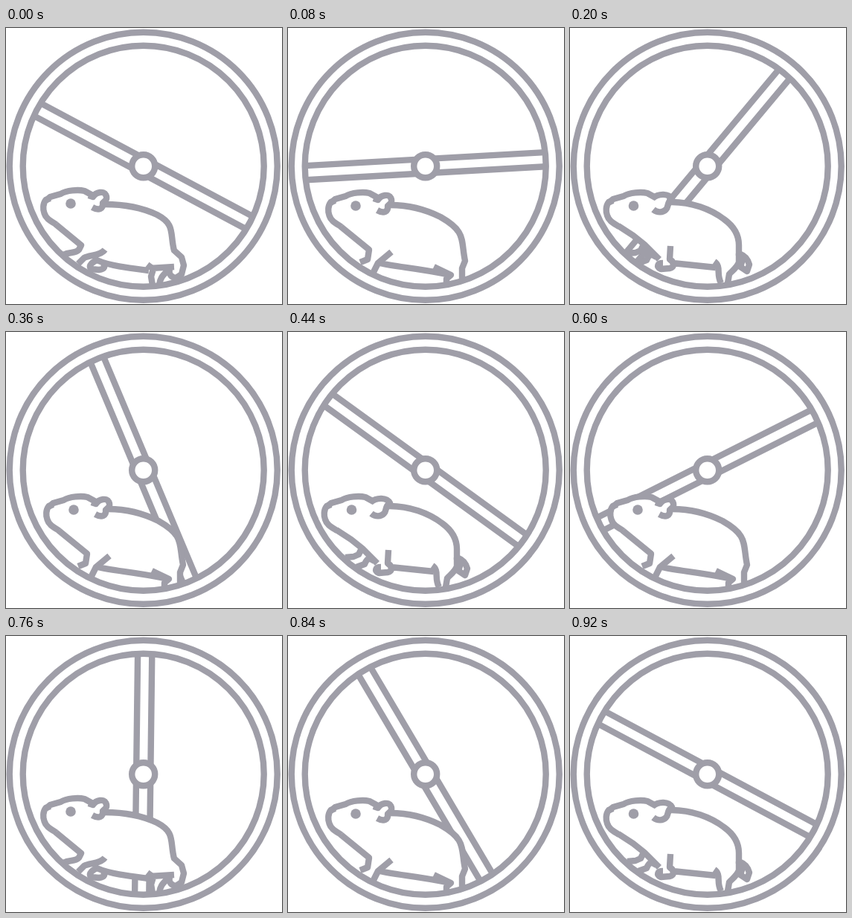
Write an HTML page that moves like this. It is 371 px wide and 371 px high and loops after 0.96 s.

```html
<!DOCTYPE html>
<html lang="en">
<head>
<meta charset="utf-8">
<title>Hamster wheel</title>
<style>
  html, body { margin: 0; width: 100%; height: 100%; overflow: hidden; background: #fff; }
  svg { display: block; width: 100vw; height: 100vh; }
  .line { fill: none; stroke: #9f9ea8; stroke-width: 8.4; stroke-linejoin: round; }
  .skin { fill: #fff; }
  .eye { fill: #9f9ea8; }
  .hub { fill: #fff; }
</style>
</head>
<body>
<svg viewBox="0 0 371 371">
  <defs>
    <g id="head">
      <path class="line" d="M58 232L52 234C48 239 48 247 50 252C52 259 58 262 66 267"/>
      <path class="line" d="M52 235L58 230 72 226C80 221 96 220 104 222L115 228"/>
      <circle class="eye" cx="85.500" cy="239" r="6.800"/>
    </g>
    <path id="ear" class="line" d="M111 225L117 227C121 220 132 219 134 224C137 230 134 232 130 235C131 243 125 246 116 241"/>
  </defs>
  <g transform="translate(184.700 185.700)">
    <g id="bar"><path class="line" d="M-161 -9.600H161M-161 9.600H161"/></g>
    <circle class="line" r="180"/>
    <circle class="line" r="162"/>
    <circle class="line hub" r="15.500"/>
  </g>

  <g class="pose">
    <path class="skin" d="M52 237C50 250 54 258 67 264L101 291 125 312 192 325 228 321 226 299C222 255 205 242 135 237L134 222 122 221 106 219 82 218 62 226Z"/>
    <use href="#head" x="1.500" y="-3"/>
    <use href="#ear"/>
    <path class="line" d="M67 264L101 292 98 298C92 304 86 300 77 305M133 298C127 306 113 305 105 309L97 317M125 310C118 314 110 318 114 324L125 325C133 324 134 320 130 316"/>
    <path class="line" d="M122 312C140 320 168 323 192 326M190 318L198 324 195 334 197 346M194 323L226 321M219 323C216 330 208 331 206 345M221 322C217 330 222 337 232 336"/>
    <path class="line" d="M133 237C165 237 186 243 203 251C228 264 220 276 226 299L236 308 239 319 236 331 230 335"/>
  </g>

  <g class="pose">
    <path class="skin" d="M56 240C53 252 58 261 71 267L109 299 124 316 190 326 214 333 234 330 237 310 232 277C218 252 190 240 141 238L137 225 125 225 110 222 86 221 66 229Z"/>
    <use href="#head" x="5.500" y="0"/>
    <use href="#ear" x="4" y="4"/>
    <path class="line" d="M71 267L109 298 107 311 97 315M139 301L121 316 115 328"/>
    <path class="line" d="M123 316C145 321 175 323 213 331M196 321L219 332 213 337V343M197 321L204 328"/>
    <path class="line" d="M138 238C167 238 189 246 205 254C240 274 232 284 238 313L234 323V337"/>
  </g>

  <g class="pose">
    <path class="skin" d="M50 240C48 252 52 262 65 266L100 291 122 316 140 317 198 322 213 332 227 314V291C227 270 200 235 133 235L127 225 104 222 80 221 60 229Z"/>
    <use href="#head"/>
    <path class="line" d="M111 229C119 222 133 222 137 230C130 234 133 240 129 244C125 248 118 249 112 244"/>
    <path class="line" d="M65 266L85 279 100 291 120 311M99 291L95 299 88 302 77 303M116 308C108 303 106 305 103 312L92 316"/>
    <path class="line" d="M135 293L134 311C141 315 140 322 134 323L122 324C116 321 117 316 125 316M138 316L196 322"/>
    <path class="line" d="M194 314C204 321 196 330 203 343M227 303V315C224 323 217 327 214 331L212 343M229 304C235 306 239 311 241 318L238 327 229 321 233 308"/>
    <path class="line" d="M133 234C163 233 190 244 207 257C221 267 227 280 227 292V306"/>
  </g>
</svg>
<script>
  const STEP = 40, STEPS = 24, START = 28.1;
  const bar = document.getElementById('bar');
  const poses = document.querySelectorAll('.pose');

  // The bar makes one full turn between the first and last step; each pose lasts two steps.
  function draw(now) {
    const step = Math.floor(now / STEP) % STEPS;
    bar.setAttribute('transform', `rotate(${START - step * 360 / (STEPS - 1)})`);
    const active = Math.floor(step / 2) % poses.length;
    poses.forEach((pose, i) => { pose.style.display = i === active ? '' : 'none'; });
  }

  const begin = performance.now();
  function tick() {
    draw(performance.now() - begin);
    requestAnimationFrame(tick);
  }
  tick();
</script>
</body>
</html>
```
